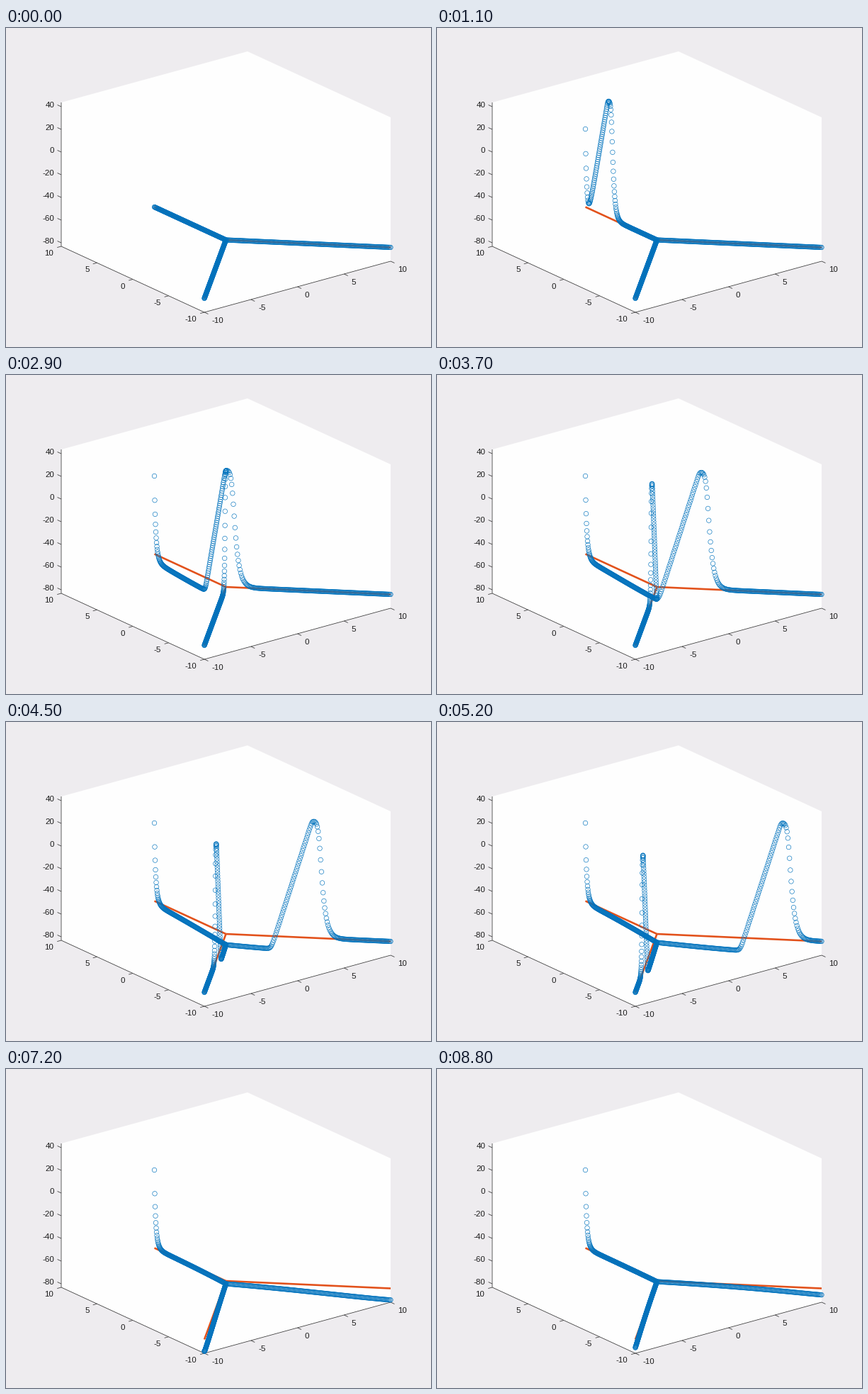
A matplotlib script for the animation above (8.9 s loop, 600 by 450 pixels).

```python
import numpy as np
import matplotlib.pyplot as plt
from matplotlib.animation import FuncAnimation

W, H, DPI = 600, 450, 100
PT = 72 / DPI
FRAMES, STEP = 89, 100
BLUE, ORANGE, INK = "#0072BD", "#E2511B", "#3c3c3c"

# Corners of the box floor, in pixels
LEFT = np.array([78, 308.0])
FRONT = np.array([280, 401.0])
RIGHT = np.array([543, 329.0])
BACK = LEFT + RIGHT - FRONT
HEIGHT = 203

REST = 19.5      # resting level above the floor
CREST = 165      # pulse height
CLAMP = 110      # height of the driven end
N = 200          # cells per branch
SPEED = 68       # cells per second that set the pulse length
cells = np.arange(N + 1)


def up(p, h):
    return p - np.array([0, h])


def floor(x, y):
    """Pixel position of a floor point, x and y from -10 to 10."""
    return FRONT + (RIGHT - FRONT) * (x + 10) / 20 + (LEFT - FRONT) * (y + 10) / 20


def soft_max(a, b, width):
    return width * np.logaddexp(a / width, b / width)


def pulse(d):
    """Height above rest, d cells ahead of the crest (behind is negative)."""
    dip = -19 * np.exp(-(d / 235) ** 2)
    back = soft_max(175.7 + 3.56 * d, dip, 5)
    back = -soft_max(-back, -CREST, 3)
    front = np.exp(-0.3 * np.logaddexp(0, (d - 6.1) / 1.5))
    return back * front


class Branch:
    def __init__(self, a, b, start, speed, driven=False):
        a, b = up(a, REST), up(b, REST)
        self.base = a + (b - a) * cells[:, None] / N
        self.arrive = start + cells / speed
        if driven:
            self.drive = np.exp(-0.357 * cells ** 0.81)
        else:
            # the pulse hurries a little at a closed end
            self.arrive -= 0.06 * np.exp((cells - N) / 10)
            self.drive = np.zeros(N + 1)

    def points(self, t):
        v = pulse(SPEED * (self.arrive - t))
        v = np.where(v > 0, v * (1 - 0.6 * self.drive), v * (1 - self.drive) ** 2)
        v = (v + CLAMP * self.drive) * (1 - np.exp(-t / 0.08))
        return self.base - np.outer(v, [0, 1])


FORK = 2.87      # time the pulse reaches the fork
BRANCHES = [
    Branch(floor(0, 10), floor(0, 0), 0.22, 75.5, driven=True),
    Branch(floor(0, 0), floor(10, -10), FORK, 66),
    Branch(floor(0, 0), floor(-10, -10), FORK, 56),
]


def points(t):
    return np.concatenate([b.points(t) for b in BRANCHES])


fig = plt.figure(figsize=(W / DPI, H / DPI), dpi=DPI, facecolor="#EEECEF")
ax = fig.add_axes([0, 0, 1, 1])
ax.set_xlim(0, W)
ax.set_ylim(H, 0)
ax.axis("off")


def line(a, b, color=INK, width=0.8, z=2):
    ax.plot([a[0], b[0]], [a[1], b[1]], color=color, lw=width * PT,
            solid_capstyle="butt", snap=False, zorder=z)


def label(x, y, value, side):
    ax.text(x, y - 0.5, str(value), ha=side, va="center_baseline", color="#1c1c1c",
            family="Liberation Sans", size=11.5 * PT, zorder=2)


def draw_box():
    outline = [LEFT, FRONT, RIGHT, up(RIGHT, HEIGHT), up(BACK, HEIGHT), up(LEFT, HEIGHT)]
    ax.fill(*np.array(outline).T, color="#FEFEFE", lw=0, zorder=1)
    line(up(LEFT, HEIGHT), LEFT)
    line(LEFT, FRONT)
    line(FRONT, RIGHT)
    out_y = (LEFT - FRONT) / np.hypot(*(LEFT - FRONT)) * 6
    out_x = (FRONT - RIGHT) / np.hypot(*(FRONT - RIGHT)) * 6
    for i, value in enumerate(range(-80, 41, 20)):
        p = np.array([LEFT[0], 303 - 32 * i])
        line(p, p + out_y)
        label(68.5, p[1] - 2, value, "right")
    for value in range(-10, 11, 5):
        p = floor(-10, value)
        line(p, p + out_x)
        label(p[0] - 10.5, p[1] + 9.5, value, "right")
        p = floor(value, -10)
        line(p, p - out_y)
        label(p[0] + 10.5, p[1] + 12, value, "left")


draw_box()
for b in BRANCHES:
    line(b.base[0], b.base[-1], ORANGE, 2.6, 3)
dots = ax.scatter(*points(0).T, s=(6.5 * PT) ** 2, facecolors="none",
                  edgecolors=BLUE, linewidths=0.62 * PT, zorder=4)


def update(i):
    dots.set_offsets(points(i * STEP / 1000))
    return (dots,)


anim = FuncAnimation(fig, update, frames=FRAMES, interval=STEP, repeat=True,
                     repeat_delay=0, blit=False)
plt.show()
```
